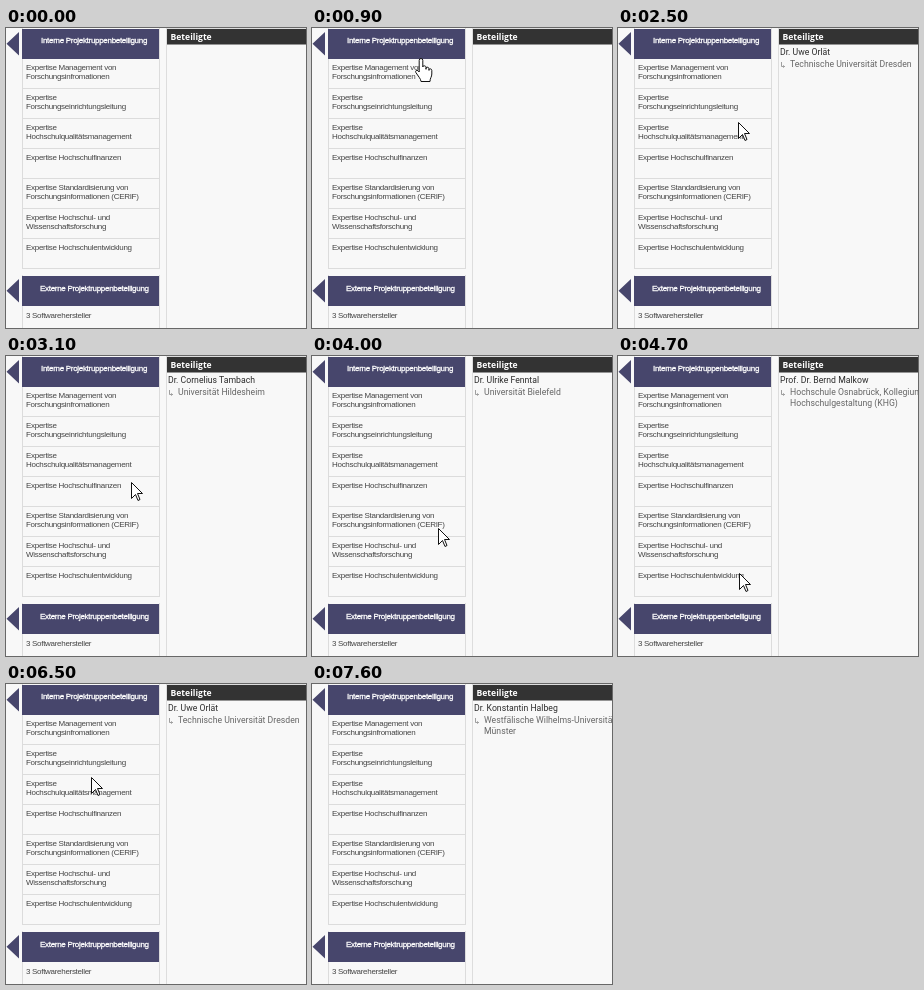
Recreate the animation shown at these times as an HTML page. Size 300x300 px, loop 8 s.

```html
<!DOCTYPE html>
<html lang="de">
<head>
<meta charset="utf-8">
<style>
html, body { margin: 0; width: 100%; height: 100%; overflow: hidden; background: #f8f8f8; }
svg { display: block; width: 100vw; height: 100vh; }
text { white-space: pre; }
.menu text { font: 8px "Liberation Sans", Arial, sans-serif; letter-spacing: -.3px; fill: #444; }
.menu .head { fill: #fff; stroke: #fff; stroke-width: .3px; }
.title { font: 700 8.6px "Open Sans", sans-serif; fill: #fff; }
#panel text { font: 8.7px Roboto, sans-serif; fill: #666; }
#panel .name { fill: #2b2b2b; }
.cursor { fill: #fff; stroke: #111; stroke-linejoin: round; }
</style>
</head>
<body>
<svg viewBox="0 0 300 300">
  <g class="menu" id="menu"></g>
  <path d="M160.5 0V300M160 .5H300" stroke="#ddd"/>
  <rect x="161" y="1" width="139" height="15.5" fill="#333"/>
  <text class="title" x="164.5" y="12">Beteiligte</text>
  <g id="panel"></g>
  <path class="cursor" id="arrow" d="M.5.5V16.5L4.5 12.5 7 18.5 9 17.5 6.5 11.5H11.5Z"/>
  <path class="cursor" id="hand" d="M-1.8 14V2.3a1.8 1.8 0 0 1 3.6 0V9c0-1.6 3.2-1.6 3.2.3v2-1.2c.3-1.4 3-1.2 3 .7v1.6-.8c.4-1.2 2.8-1 2.8.8V16c0 3-1.8 4-1.8 7.5H0c0-2.5-3-5.5-5.2-9.1-.8-1.6 1-2.8 2.2-1.6z"/>
</svg>
<script>
const LOOP = 8000, STEP = 100, ROW = 30;

// Menu label lines, then the person and institution shown on hover
const rows = [
  [['Expertise Management von', 'Forschungsinfromationen'],
   ['Dr. Konstantin Halbeg', 'Westfälische Wilhelms-Universität', 'Münster']],
  [['Expertise', 'Forschungseinrichtungsleitung'],
   ['Prof. Dr-Ing. Karl Leonhard Brühns', 'Universität Hamburg']],
  [['Expertise', 'Hochschulqualitätsmanagement'],
   ['Dr. Uwe Orlät', 'Technische Universität Dresden']],
  [['Expertise Hochschulfinanzen'],
   ['Dr. Cornelius Tambach', 'Universität Hildesheim']],
  [['Expertise Standardisierung von', 'Forschungsinformationen (CERIF)'],
   ['Dr. Ulrike Fenntal', 'Universität Bielefeld']],
  [['Expertise Hochschul- und', 'Wissenschaftsforschung'],
   ['Prof. Dr. Gerlind Asthof', 'Universität Kassel']],
  [['Expertise Hochschulentwicklung'],
   ['Prof. Dr. Bernd Malkow', 'Hochschule Osnabrück, Kollegium für', 'Hochschulgestaltung (KHG)']],
];

// Where the pointer rests; it glides evenly from one stop to the next
const stops = [
  { arrive: 500, leave: 500, x: 104, y: 8 },
  { arrive: 1200, leave: 1600, x: 113, y: 46 },
  { arrive: 2600, leave: 2800, x: 121, y: 99 },
  { arrive: 3400, leave: 3700, x: 128, y: 152 },
  { arrive: 4700, leave: 5500, x: 121, y: 217 },
  { arrive: 6500, leave: 6500, x: 85, y: 93 },
  { arrive: 7000, leave: 7200, x: 78, y: 23 },
  { arrive: 7600, leave: 7600, x: 78, y: -24 },
];

const $ = id => document.getElementById(id);
const label = (x, y, s, cls = '') => `<text x="${x}" y="${y}" class="${cls}">${s}</text>`;
const header = (y, x, baseline, s) =>
  `<path d="M16 ${y}h137v30h-137ZM13 ${y + 3}v23.5L.5 ${y + 14.75}Z" fill="#47466c"/>` +
  label(x, baseline, s, 'head');

function drawMenu() {
  let lines = 'M16.5 0V240M153.5 0V240M16.5 247V300M153.5 247V300', labels = '';
  rows.forEach(([text], i) => {
    lines += `M16 ${60.5 + i * ROW}H154`;
    text.forEach((s, j) => labels += label(20, 42 + i * ROW + j * 9, s));
  });
  $('menu').innerHTML = `<path d="${lines}" stroke="#dcdcdc"/>` + labels +
    header(1, 35, 15, 'Interne Projektruppenbeteiligung') +
    header(248, 34, 263, 'Externe Projektruppenbeteiligung') +
    label(20, 290, '3 Softwarehersteller');
}

function cursorAt(t) {
  const next = stops.findIndex(s => s.arrive > t);
  if (next < 1) return null;
  const a = stops[next - 1], b = stops[next];
  const k = Math.max(0, (t - a.leave) / (b.arrive - a.leave));
  const mix = (p, q) => Math.round(p + (q - p) * k);
  return { x: mix(a.x, b.x), y: mix(a.y, b.y) };
}

let shown;
function showPerson(row) {
  if (row === shown) return;
  shown = row;
  if (row < 0) return $('panel').innerHTML = '';
  const [name, ...places] = rows[row][1];
  $('panel').innerHTML = label(162, 27, name, 'name') +
    '<path d="M163.5 34V38.5H166.5M165.3 37.3L166.5 38.5 165.3 39.7" fill="none" stroke="#888" stroke-width=".8"/>' +
    places.map((s, j) => label(172, 39 + j * 11, s)).join('');
}

function place(id, pos, visible) {
  $(id).style.display = visible ? '' : 'none';
  if (visible) $(id).setAttribute('transform', `translate(${pos.x} ${pos.y})`);
}

function draw() {
  const t = Math.floor(performance.now() % LOOP / STEP) * STEP;
  const pos = cursorAt(t);
  const inRows = pos && pos.y > ROW;
  place('arrow', pos, inRows);
  place('hand', pos, pos && !inRows);
  // The last person stays when the pointer leaves the rows
  showPerson(inRows ? Math.floor(pos.y / ROW) - 1 : t < stops[1].arrive ? -1 : 0);
  requestAnimationFrame(draw);
}

drawMenu();
draw();
</script>
</body>
</html>
```
